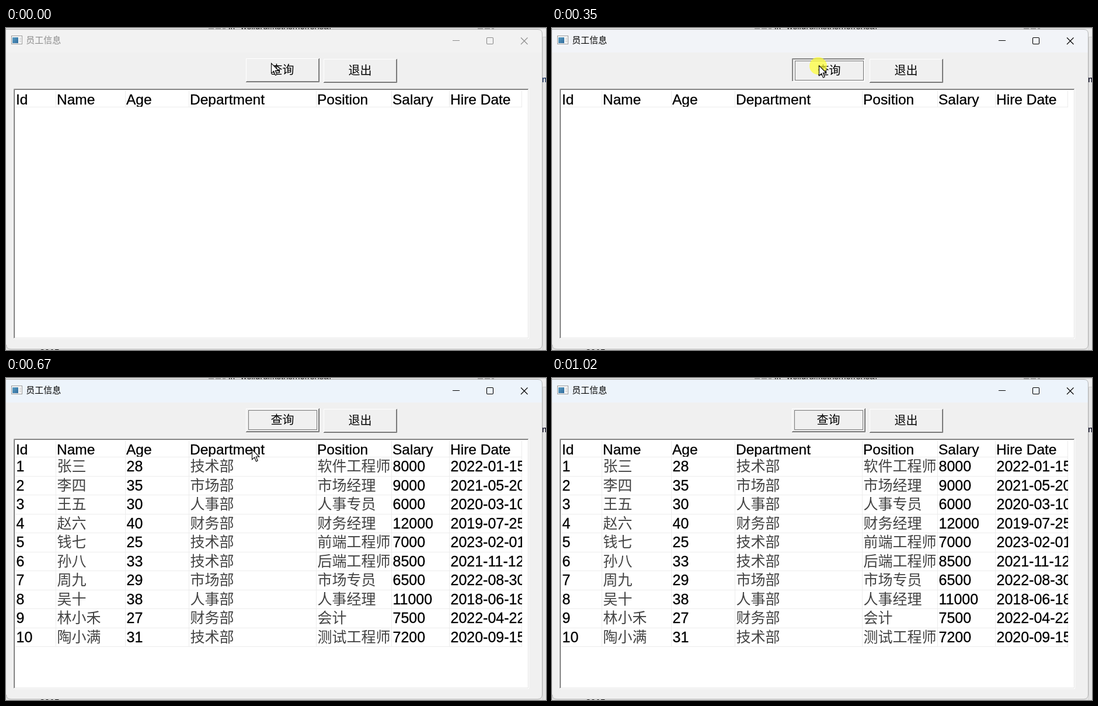
Write an HTML page that moves like this. It is 925x552 px and loops after 1.15 s.

```html
<!DOCTYPE html>
<html lang="zh">
<head>
<meta charset="utf-8">
<title>员工信息</title>
<style>
html, body { margin: 0; width: 100%; height: 100%; overflow: hidden; background: #e4e4e4; }
svg { display: block; width: 925px; height: 552px; }
text { white-space: pre; }
.cell { font: 25px "Liberation Sans", Arial, sans-serif; fill: #000; stroke: #000; stroke-width: .3px; }
.head { font-size: 24.5px; }
.han { font: 300 25px "Noto Sans CJK SC", "Noto Sans CJK", sans-serif; fill: #444; }
.label { font: 20px "Noto Sans CJK SC", "Noto Sans CJK", sans-serif; fill: #000; }
.title { font: 15px "Noto Sans CJK SC", "Noto Sans CJK", sans-serif; }
.back { font: bold 15px "Liberation Sans", Arial, sans-serif; fill: #222; }
</style>
</head>
<body>
<svg viewBox="0 0 925 552">
  <defs>
    <clipPath id="win"><path d="M0 2H911Q919 2 919 10V542Q919 550 911 550H8Q0 550 0 542Z"/></clipPath>
    <clipPath id="head"><rect x="16" y="107" width="868" height="28"/></clipPath>
    <clipPath id="body"><rect x="16" y="136" width="868" height="326"/></clipPath>
    <linearGradient id="blue" x2="1" y2="1"><stop stop-color="#5b9fc4"/><stop offset="1" stop-color="#2f6a9c"/></linearGradient>
  </defs>

  <rect width="925" height="552" fill="#e4e4e4"/>
  <rect width="925" height="15" fill="#eeeeee"/>
  <rect width="925" height="2" fill="#dcdcdc"/>
  <path d="M347 1H376M808 1H836" stroke="#a8a8a8" stroke-width="2" stroke-dasharray="9 3"/>
  <text class="back" x="381" y="2" style="font-weight:400">if(_wsildrul.ksthsme[rsnsa]</text>
  <path d="M919.5 15.5H925" stroke="#cfcfcf"/>
  <path d="M919.5 16V552" stroke="#d2d2d2"/>
  <text class="back" id="edge" x="917.5" y="93">n</text>
  <text class="back" x="58" y="561">2015</text>

  <g clip-path="url(#win)">
    <rect width="925" height="552" fill="#f0f0f0"/>
    <rect id="bar" width="925" height="42"/>
  </g>
  <path d="M0 2.5H911Q918.5 2.5 918.5 10V542Q918.5 550.5 911 550.5H8Q.5 550.5 .5 543" fill="none" stroke="#b4b4b4"/>

  <rect x="9.5" y="13.5" width="18" height="14" fill="#fafafa" stroke="#9a9a9a"/>
  <rect x="11" y="16" width="10" height="10" fill="url(#blue)"/>
  <path d="M23 17.5H26M23 20.5H26M23 23.5H26" stroke="#b5b5b5"/>
  <g id="chrome">
    <text class="title" x="34.3" y="26" fill="currentColor">员工信息</text>
    <path d="M765 21.5H777M882 16.5L893.5 28M893.5 16.5L882 28" fill="none" stroke="currentColor" stroke-width="1.1"/>
    <rect x="823.5" y="16.5" width="11" height="11" rx="1.5" fill="none" stroke="currentColor" stroke-width="1.1"/>
  </g>

  <g id="buttons"></g>
  <g id="list"></g>
  <circle id="halo" cx="456" cy="65" r="15" fill="#ffff30" fill-opacity=".7"/>
  <path id="arrow" d="M.5 .5V17.8L4.6 14L7.5 20.9L10.2 19.7L7.3 13H12.8Z" fill="#fff" stroke="#000" stroke-width="1.1"/>
</svg>
<script>
const LOOP = 1150;
const $ = id => document.getElementById(id);

function add(parent, tag, attrs, text) {
  const el = document.createElementNS("http://www.w3.org/2000/svg", tag);
  for (const k in attrs) el.setAttribute(k, attrs[k]);
  if (text !== undefined) el.textContent = text;
  parent.appendChild(el);
  return el;
}
const group = (parent, attrs = {}) => add(parent, "g", attrs);
const rect = (p, x, y, width, height, fill) => add(p, "rect", { x, y, width, height, fill });
const line = (p, d, stroke) => add(p, "path", { d, stroke, fill: "none" });

// Nested one-pixel bevel: top-left and bottom-right colours, outermost first
function bevel(p, x, y, w, h, light, dark) {
  light.forEach((c, i) => line(p, `M${x + i + .5} ${y + h - i}V${y + i + .5}H${x + w - i}`, c));
  dark.forEach((c, i) => line(p, `M${x + i} ${y + h - i - .5}H${x + w - i - .5}V${y + i}`, c));
}

function button(x, y, label, pressed, focused) {
  const g = group($("buttons"));
  const d = pressed ? 1 : 0;
  rect(g, x, y, 126, 41, "#f0f0f0");
  if (pressed) bevel(g, x, y, 125, 40, ["#808080", "#8c8c8c"], ["#fff"]);
  else bevel(g, x, y, 126, 41, ["#fff"], ["#696969", "#8c8c8c"]);
  if (focused) add(g, "rect", {
    x: x + 4.5 + d, y: y + 3.5 + d, width: 117, height: 33,
    fill: "none", stroke: "#000", "stroke-dasharray": "1 1"
  });
  add(g, "text", { class: "label", x: x + 42.5 + d, y: y + 27 + d }, label);
  return g;
}
const idle = button(411, 52, "查询", false, false);
const down = button(411, 52, "查询", true, true);
const focus = button(411, 52, "查询", false, true);
button(544, 53, "退出", false, false);

const cols = [16, 86, 205, 314, 532, 661, 760];
const heads = ["Id", "Name", "Age", "Department", "Position", "Salary", "Hire Date"];
const staff = `张三 28 技术部 软件工程师 8000 2022-01-15
李四 35 市场部 市场经理 9000 2021-05-20
王五 30 人事部 人事专员 6000 2020-03-10
赵六 40 财务部 财务经理 12000 2019-07-25
钱七 25 技术部 前端工程师 7000 2023-02-01
孙八 33 技术部 后端工程师 8500 2021-11-12
周九 29 市场部 市场专员 6500 2022-08-30
吴十 38 人事部 人事经理 11000 2018-06-18
林小禾 27 财务部 会计 7500 2022-04-22
陶小满 31 技术部 测试工程师 7200 2020-09-15`.split("\n").map((row, i) => [String(i + 1), ...row.split(" ")]);

const list = $("list");
const GRID = "#ececec";
rect(list, 13, 104, 883, 429, "#fff");
bevel(list, 13, 104, 883, 429, ["#a0a0a0", "#696969"], ["#fff", "#e3e3e3"]);
const edges = [...cols.slice(1), 884];
edges.forEach(x => line(list, `M${x - .5} 108V135`, GRID));
line(list, "M16 135.5H884", GRID);
const head = group(list, { "clip-path": "url(#head)" });
heads.forEach((h, c) => add(head, "text", { class: "cell head", x: cols[c] + 1, y: 131 }, h));

const rows = group(list, { "clip-path": "url(#body)" });
edges.forEach(x => line(rows, `M${x - .5} 136V461`, GRID));
staff.forEach((row, r) => {
  const top = 135.5 + 32.5 * r;
  line(rows, `M16 ${Math.floor(top + 32.5) + .5}H884`, GRID);
  row.forEach((s, c) => add(rows, "text", {
    class: /^\d/.test(s) ? "cell" : "han", x: cols[c] + 1.5, y: top + 24.5
  }, s));
});

// time, pointer x, pointer y
const path = [
  [0, 454, 60], [70, 455, 61], [140, 455, 62], [210, 456, 63], [280, 456, 64],
  [350, 457, 64], [410, 456, 63], [540, 455, 64], [670, 421, 122], [740, 392, 164],
  [810, 361, 203], [880, 332, 233], [950, 175, 232], [1020, -40, 232]
];
const barTones = [[0, "#f2f2f2"], [350, "#f2f4f8"], [410, "#eff3fa"], [480, "#eef3fa"], [540, "#edf4fb"]];
const at = (table, t) => table.filter(step => step[0] <= t).pop();
const show = (el, on) => el.setAttribute("visibility", on ? "visible" : "hidden");

function draw(now) {
  const t = now % LOOP;
  const active = t >= 350, loaded = t >= 410;
  const [, x, y] = at(path, t);
  $("arrow").setAttribute("transform", `translate(${x} ${y})`);
  $("bar").setAttribute("fill", at(barTones, t)[1]);
  $("chrome").setAttribute("color", active ? "#000" : "#8c8c8c");
  $("edge").style.fill = active ? "#14142a" : "#1c3460";
  show(idle, !active);
  show(down, active && !loaded);
  show(focus, loaded);
  show($("halo"), active && !loaded);
  show(rows, loaded);
}

const start = performance.now();
function tick() {
  draw(Math.max(0, performance.now() - start));
  requestAnimationFrame(tick);
}
tick();
</script>
</body>
</html>
```
